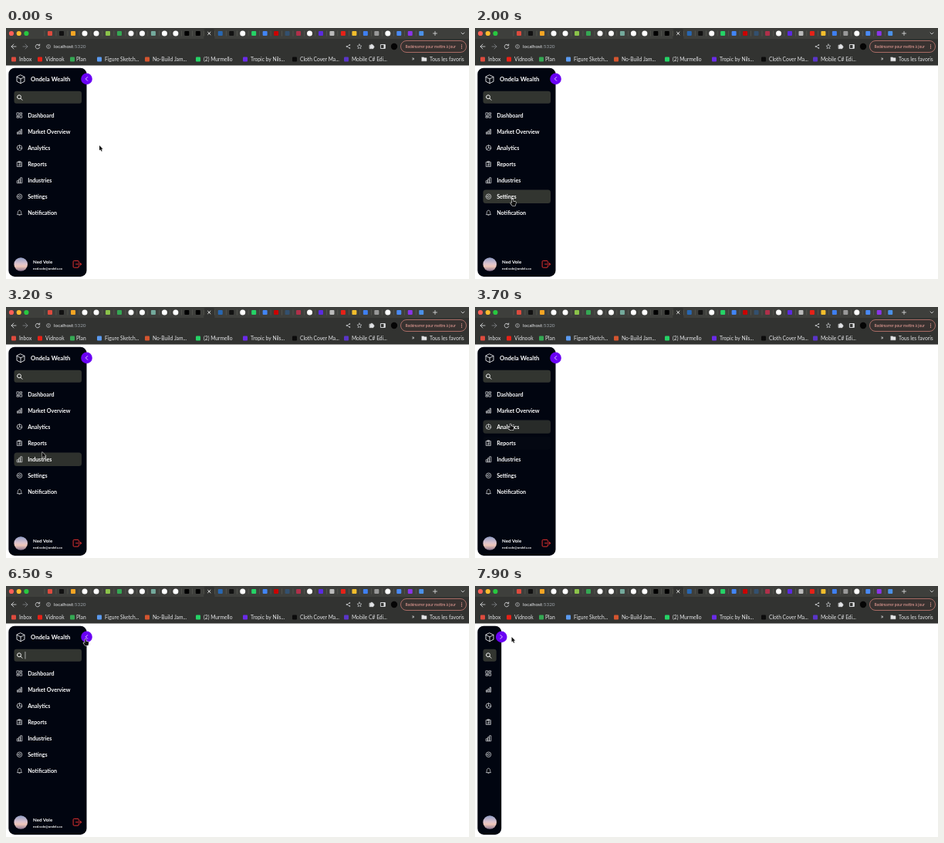
These frames come from a looping animation (600x325 px, 8 s). An HTML page with a canvas:

```html
<!DOCTYPE html>
<html lang="fr">
<head>
<meta charset="utf-8">
<title>Sidebar</title>
<style>
  html, body { margin: 0; width: 100%; height: 100%; overflow: hidden; background: #fff; }
  canvas { display: block; width: 600px; height: 325px; }
</style>
</head>
<body>
<canvas id="stage"></canvas>
<script>
const canvas = document.getElementById('stage');
const ctx = canvas.getContext('2d');
const scale = window.devicePixelRatio || 1;
canvas.width = 600 * scale;
canvas.height = 325 * scale;

const LOOP = 8000, STEP = 100, FADE = 150;
const INK = '#010510', FIELD = '#323530', PURPLE = '#6a00f4', PALE = '#e3e4e6';
const STRIP = '#3e3f3c', TOOLBAR = '#323331';

const circlePath = (x, y, r) => `M${x - r} ${y}a${r} ${r} 0 1 1 ${2 * r} 0a${r} ${r} 0 1 1 ${-2 * r} 0`;

const ICONS = {
  cube: 'M0-5.4L5-2.9V2.9L0 5.4L-5 2.9V-2.9ZM-5-2.9L0-.4L5-2.9M0-.4V5.4',
  search: circlePath(-.7, -.7, 2.5) + 'M1.1 1.1L3.3 3.3',
  logout: 'M2-1.8V-3.2Q2-4.4 .8-4.4H-4Q-5.2-4.4-5.2-3.2V3.2Q-5.2 4.4-4 4.4H.8Q2 4.4 2 3.2V1.8M-1.8 0H5.3M3.5-1.8L5.4 0L3.5 1.8',
  chevron: 'M1.2-2.4L-1.2 0L1.2 2.4',
  back: 'M3 0H-3M0-3L-3 0L0 3',
  reload: 'M2.3-1.6A2.8 2.8 0 1 0 2.7 1M2.7-3V-1.2H.8',
  info: circlePath(0, 0, 2.5) + 'M0-.3V1.3M0-1.4V-1',
  share: 'M1.9-2L-1.9 0L1.9 2' + circlePath(1.9, -2, .5) + circlePath(-1.9, 0, .5) + circlePath(1.9, 2, .5),
  star: 'M0-3L.9-1L3-.8L1.4.6L1.9 2.7L0 1.6L-1.9 2.7L-1.4.6L-3-.8L-.9-1Z',
  puzzle: 'M-2.6-1.8H-.9V-2.7H.7V-1.8H2V-.3H3V1.3H2V2.7H-2.6Z',
  panel: 'M-2.7-2.5H2.7V2.5H-2.7Z',
  cross: 'M-1.7-1.7L1.7 1.7M1.7-1.7L-1.7 1.7',
  plus: 'M-2.5 0H2.5M0-2.5V2.5',
  down: 'M-2-1L0 1L2-1',
  folder: 'M-3-2.4H-.6L.3-1.5H3V2.5H-3Z',
  beam: 'M-1.5-3.8Q0-3.8 0-2.9Q0-3.8 1.5-3.8M0-2.9V2.9M-1.5 3.8Q0 3.8 0 2.9Q0 3.8 1.5 3.8',
  hand: 'M-.7 .6Q0-.2 .7 .6V3L3.7 3.7Q4.4 4 4.2 5L3.5 8.5H-.4L-2.7 5.4Q-2.5 4.4-1.5 4.8L-.7 5.4Z',
  arrow: 'M0 0V6.6L1.5 5.2L2.6 7.8L3.7 7.3L2.6 4.8H4.6Z'
};

const MENU = [
  ['Dashboard', 'M-3.2-3.2h2.4v3.4h-2.4zM.8-3.2h2.4v2h-2.4zM.8.1h2.4v3.1h-2.4zM-3.2 1.5h2.4v1.7h-2.4z'],
  ['Market Overview', 'M-3 2.8v-2h1.5v2zM-.7 2.8v-3.6h1.5v3.6zM1.6 2.8v-5.6h1.5v5.6z'],
  ['Analytics', circlePath(0, 0, 3.3) + 'M0-3.3V0L3.2 .8M0 0L-2.5 2.2'],
  ['Reports', 'M-2.9-2.5h5.8v5.8h-5.8zM-1.1-3.4h2.2v1.5h-2.2zM-1.4 2v-1.4M0 2v-2.2M1.4 2v-2.8'],
  ['Industries', 'M-3.3 3.2v-2.6h2.2v2.6zM-1.1 3.2v-4.6h2.2v4.6zM1.1 3.2v-6.6h2.2v6.6z'],
  ['Settings', circlePath(0, 0, 3.3) + circlePath(0, 0, 1.4)],
  ['Notification', 'M-2.8 2C-2 1-2.3-.5-2-1.4C-1.5-3.8 1.5-3.8 2-1.4C2.3-.5 2 1 2.8 2ZM-.8 3Q0 3.8 .8 3']
];
const menuY = i => 113 + 21.05 * i;

const TABS = ('#dd4b3e #111 #f5a524 #fff #fff #8bc34a #35a853 #fff #fff #74aa9c #fff #fff #000 #000 - ' +
  '#2867b2 #111 #fff #25d366 #4285f4 #cb0000 #33506f #b0304a #fff #5b2be0 #bbb #e62117 #f2bd2c ' +
  '#3f7ff0 #999 #fff #4a8af4 #8a35e8 #4b91e8').split(' ');
const tabX = i => i < 7 ? 57 + 15 * i : 162 + 14.47 * (i - 7);

const BOOKMARKS = [
  [10, 17, '#dd4b3e', 'Inbox'], [44, 51, '#e62117', 'Vidnook'],
  [86, 91, '#35a853', 'Plan'], [121, 128, '#5b9bf0', 'Figure Sketch...'],
  [183, 190, '#d4552f', 'No-Build Jam...'], [249, 256, '#25d366', '(2) Murmello'],
  [310, 317, '#6a2be8', 'Tropic by Nils...'], [374, 381, '#0b0b0b', 'Cloth Cover Ma...'],
  [441, 448, '#5a35c8', 'Mobile C# Edi...']
];

// Pointer stops: time, x, y
const POINTER = [
  [0, 121, 152], [400, 121, 152], [1300, 51.5, 202], [1600, 51.5, 202], [2300, 47, 234],
  [2600, 47, 234], [3500, 47, 172], [3700, 46, 151], [4400, 45, 116], [4660, 45, 116],
  [4800, 44.3, 92.5], [5100, 44, 90], [5400, 44, 90], [6300, 104, 69], [6500, 103, 68.5],
  [7500, 103, 68.5], [7900, 47.5, 66], [8000, 47.5, 66]
];

const clamp = v => Math.min(1, Math.max(0, v));
const smooth = v => v * v * (3 - 2 * v);

function pointerAt(t) {
  const i = Math.max(1, POINTER.findIndex(stop => stop[0] >= t));
  const [t0, x0, y0] = POINTER[i - 1], [t1, x1, y1] = POINTER[i];
  const k = smooth(clamp((t - t0) / (t1 - t0)));
  return { x: x0 + (x1 - x0) * k, y: y0 + (y1 - y0) * k };
}

const inRow = (p, y, half) => p.x > 10.5 && p.x < 98 && Math.abs(p.y - y) < half;

// Share of the last FADE milliseconds that the pointer spent over a menu row
function glow(t, i) {
  const samples = 15;
  let hits = 0;
  for (let k = 0; k < samples; k++) {
    if (inRow(pointerAt(Math.max(0, t - k * FADE / samples)), menuY(i), 9)) hits++;
  }
  return hits / samples;
}

function box(x, y, w, h, r, color) {
  ctx.beginPath();
  ctx.roundRect(x, y, w, h, r);
  ctx.fillStyle = color;
  ctx.fill();
}

function disc(x, y, r, color) {
  ctx.beginPath();
  ctx.arc(x, y, r, 0, 7);
  ctx.fillStyle = color;
  ctx.fill();
}

function text(str, x, y, size, color, weight = 400) {
  ctx.font = `${weight} ${size}px Lato, sans-serif`;
  ctx.fillStyle = color;
  ctx.fillText(str, x, y);
}

function icon(path, x, y, color = PALE, width = .8, flip = 1, fill) {
  const shape = new Path2D(path);
  ctx.save();
  ctx.translate(x, y);
  ctx.scale(flip, 1);
  ctx.lineWidth = width;
  ctx.lineJoin = ctx.lineCap = 'round';
  ctx.strokeStyle = color;
  ctx.stroke(shape);
  if (fill) {
    ctx.fillStyle = fill;
    ctx.fill(shape);
  }
  ctx.restore();
}

function drawBrowser() {
  box(0, 0, 600, 14, 0, STRIP);
  box(0, 14, 600, 34.4, 0, TOOLBAR);
  ['#ff5f57', '#febc2e', '#28c840'].forEach((c, i) => disc(7 + 9.7 * i, 7, 3.1, c));

  TABS.forEach((color, i) => {
    const x = tabX(i);
    if (color === '-') {
      box(x - 7, 1, 14, 13, [3, 3, 0, 0], TOOLBAR);
      icon(ICONS.cross, x, 7, '#fff', .9);
    } else if (color === '#fff') {
      disc(x, 7, 3.5, color);
    } else {
      box(x - 3, 4, 6, 6, 1, color);
    }
    box(x - 7.3, 3.5, .5, 7, 0, '#66685f');
  });
  icon(ICONS.plus, 556, 7);
  icon(ICONS.down, 592, 7);

  icon(ICONS.back, 10, 24);
  icon(ICONS.back, 25, 24, '#85878b', .8, -1);
  icon(ICONS.reload, 41, 24);
  icon(ICONS.info, 55, 24, '#c5c7ca', .6);
  text('localhost', 62, 26.3, 6.4, '#e8eaed');
  text(':5320', 62 + ctx.measureText('localhost').width, 26.3, 6.4, '#9aa0a6');
  icon(ICONS.share, 443.5, 24, '#d5d7da', .7);
  icon(ICONS.star, 458, 24, '#c5c7ca', .7);
  icon(ICONS.puzzle, 474, 24, PALE, .7, 1, PALE);
  icon(ICONS.panel, 488.5, 24, PALE, .9);
  box(489.5, 21.5, 2, 5, 0, PALE);
  disc(503, 24, 4.2, '#050505');

  box(511.5, 16.5, 85, 15, 7.5, '#383230');
  ctx.strokeStyle = '#d9857c';
  ctx.lineWidth = .7;
  ctx.stroke();
  text('Redémarrer pour mettre à jour', 517.5, 25.8, 4.9, '#f2a59d');
  [-2.2, 0, 2.2].forEach(dy => disc(590.5, 24 + dy, .65, '#f2a59d'));

  for (const [iconX, textX, color, label] of BOOKMARKS) {
    box(iconX - 3, 37.5, 6, 6, 1, color);
    text(label, textX, 42.6, 6.7, PALE);
  }
  text('»', 526, 42.3, 7, PALE, 700);
  icon(ICONS.folder, 542, 40.3, PALE, .5, 1, PALE);
  text('Tous les favoris', 549, 42.6, 6.7, PALE);
}

// Everything that the collapsing panel cuts off at its inner edge
function drawLabels(inner) {
  ctx.save();
  ctx.beginPath();
  ctx.rect(10.5, 52, inner, 270);
  ctx.clip();
  text('Ondela Wealth', 32, 69.3, 7.7, '#fff', 700);
  MENU.forEach(([label], i) => text(label, 28.2, menuY(i) + 2.5, 7.1, '#fff', 700));
  text('Ned Vole', 35, 305.4, 6.2, '#fff', 700);
  text('ned.vole@ondela.co', 35, 313, 4.3, '#fff', 700);
  icon(ICONS.logout, 92.3, 305.8, '#e0302f', 1);
  ctx.restore();
}

function drawSidebar(t, right) {
  const inner = right - 17;
  box(3.3, 51.7, right - 3.3, 270.2, 8, INK);

  icon(ICONS.cube, 19, 66.3, '#fff');
  box(10.5, 81.8, inner, 16, 3, FIELD);
  icon(ICONS.search, 17.7, 90, '#fff', .9);
  if (t >= 5500 && t < 6700) box(24.6, 85, .7, 9.5, 0, '#d8d8d8');

  MENU.forEach(([, path], i) => {
    const y = menuY(i);
    ctx.globalAlpha = glow(t, i);
    box(10.5, y - 8.7, inner, 17.4, 3.5, FIELD);
    ctx.globalAlpha = 1;
    icon(path, 17.5, y, '#e6e7e9', .7);
  });
  drawLabels(inner);

  const sky = ctx.createLinearGradient(0, 297, 0, 315);
  sky.addColorStop(0, '#8d9cc4');
  sky.addColorStop(.45, '#dcc3cf');
  sky.addColorStop(.65, '#efc6b8');
  sky.addColorStop(1, '#84718f');
  disc(19.2, 306, 8.8, sky);

  disc(right, 65.9, 7.3, PURPLE);
  icon(ICONS.chevron, right, 65.9, '#fff', .8, t < 6700 ? 1 : -1);
}

function drawPointer(p, right) {
  const overToggle = Math.hypot(p.x - right, p.y - 66) < 7.5;
  const overItem = MENU.some((_, i) => inRow(p, menuY(i), 9));
  if (inRow(p, 90, 8.2)) {
    icon(ICONS.beam, p.x, p.y, '#111', 1.8);
    icon(ICONS.beam, p.x, p.y, '#fff', .9);
  } else if (overToggle || overItem) {
    icon(ICONS.hand, p.x, p.y, '#fff', 1.1, 1, '#111');
  } else {
    icon(ICONS.arrow, p.x, p.y, '#fff', .8, 1, '#111');
  }
}

function frame(now) {
  const t = Math.floor(now % LOOP / STEP) * STEP;
  const right = 104.5 - 70.3 * smooth(clamp((t - 6620) / 360));
  ctx.setTransform(scale, 0, 0, scale, 0, 0);
  box(0, 0, 600, 325, 0, '#fff');
  drawBrowser();
  drawSidebar(t, right);
  drawPointer(pointerAt(t), right);
  requestAnimationFrame(frame);
}
requestAnimationFrame(frame);
</script>
</body>
</html>
```
